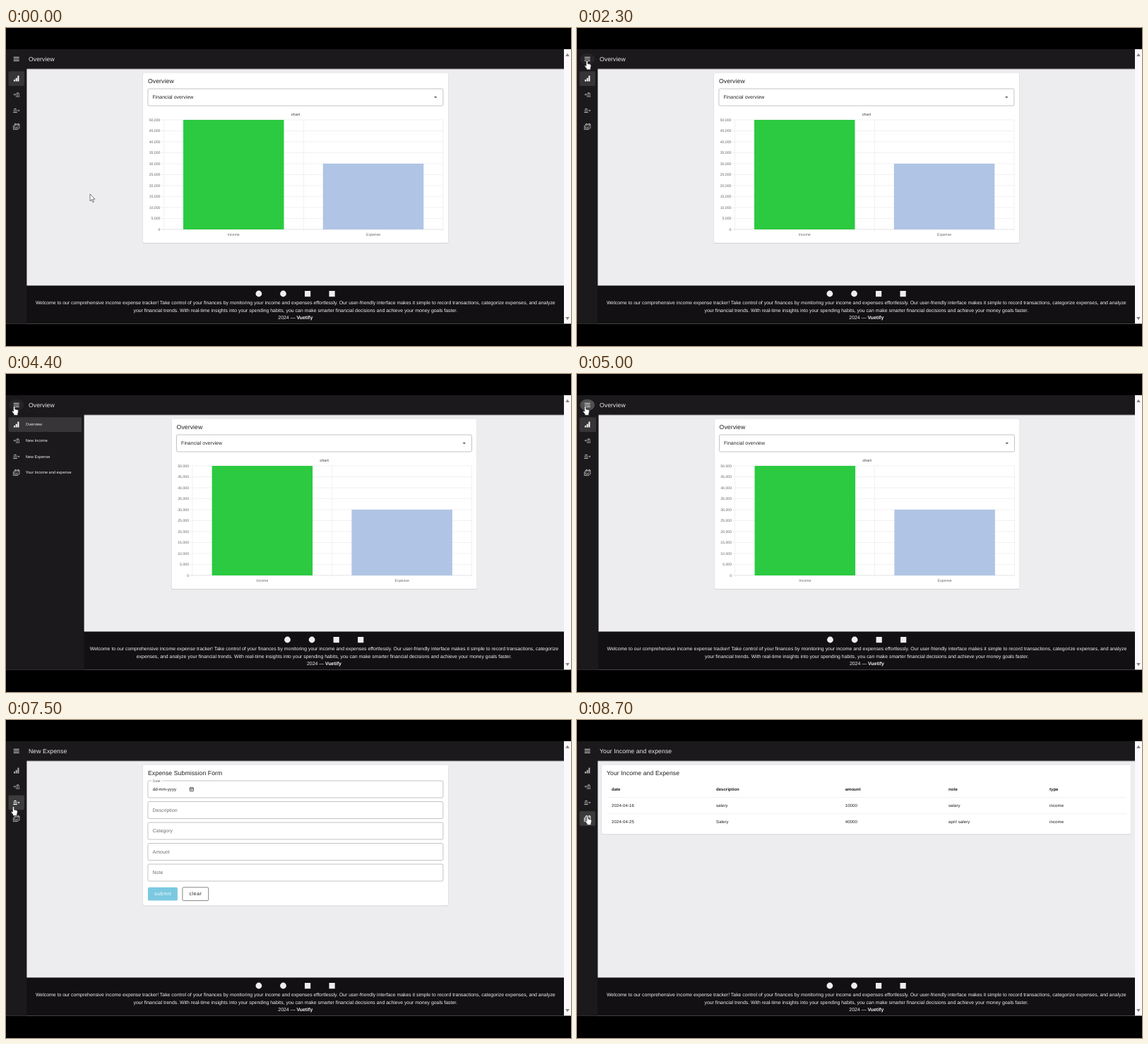
An HTML page for the animation above (9000 ms loop, 800 by 450 pixels).

```html
<!DOCTYPE html>
<html lang="en">
<head>
<meta charset="utf-8">
<title>Income expense tracker</title>
<style>
  html, body { margin: 0; width: 100%; height: 100%; overflow: hidden; background: #000; }
  svg { display: block; width: 800px; height: 450px; }
  text { font-family: "Liberation Sans", Arial, sans-serif; text-rendering: geometricPrecision; }
</style>
</head>
<body>
<svg id="stage" viewBox="0 0 800 450"></svg>
<script>
const RAIL = 29.4, OPEN = 110.6, DARK = '#1b191b', BODY = 6.91;
const ITEM_Y = [71.5, 94.2, 116.8, 139.4];
const NAV = ['Overview', 'New Income', 'New Expense', 'Your Income and expense'];
const WORDS = ('Welcome to our comprehensive income expense tracker! Take control of your finances by ' +
  'monitoring your income and expenses effortlessly. Our user-friendly interface makes it simple to record ' +
  'transactions, categorize expenses, and analyze your financial trends. With real-time insights into your ' +
  'spending habits, you can make smarter financial decisions and achieve your money goals faster.').split(' ');

const text = (x, y, s, size, fill = '#1c1c1c', more = '') =>
  `<text x="${x}" y="${y}" font-size="${size}" fill="${fill}" ${more}>${s}</text>`;
const rect = (x, y, w, h, fill, more = '') =>
  `<rect x="${x}" y="${y}" width="${w}" height="${h}" fill="${fill}" ${more}/>`;
const path = (d, more = '') => `<path d="${d}" ${more}/>`;
const mid = 'text-anchor="middle"';

const card = (x, w, h, title) =>
  rect(x - .3, 64.3, w + .6, h + .5, '#c9c8cb', 'rx="1.8"') + rect(x, 64, w, h, '#fff', 'rx="1.7"') +
  text(x + 7, 77.6, title, 8.65, '#1c1c1c', 'letter-spacing=".1"');
const field = y => rect(200.9, y, 418, 24, 'none', 'rx="1.8" stroke="#9b9a9c" stroke-width=".6"');

function chartPage() {
  let s = card(194, 432, 240, 'Overview') + field(86) +
    text(207.5, 100.4, 'Financial overview', BODY, '#222', 'letter-spacing=".06"') +
    path('M606 97h4.4l-2.2 2.2z', 'fill="#555"') +
    text(410, 124.4, 'chart', 5.2, '#666', mid + ' font-weight="bold"');
  for (let i = 0; i <= 10; i++) {
    const y = 285 - i * 15.5;
    s += rect(219.5, y - .25, 399.5, .5, i ? '#e3e3e5' : '#c8c8ca') +
      text(218.5, y + 1.7, (i * 5000).toLocaleString('en-US'), 5.2, '#666', 'text-anchor="end"');
  }
  for (const x of [223.3, 421.2, 619]) s += rect(x - .25, 130, .5, 157, '#e3e3e5');
  return s + rect(251, 130, 142.5, 155, '#2bca40') + rect(448.8, 192, 142.5, 93, '#b0c4e5') +
    text(322.2, 294.4, 'Income', 5.2, '#666', mid) + text(520.1, 294.4, 'Expense', 5.2, '#666', mid);
}

function formPage() {
  let s = card(194, 432, 198.5, 'Expense Submission Form');
  ['', 'Description', 'Category', 'Amount', 'Note'].forEach((label, i) => {
    s += field(86 + i * 29.5) + text(207.5, 100.4 + i * 29.5, label, BODY, '#6d6c6e', 'letter-spacing=".06"');
  });
  return s + rect(206.3, 84.5, 14.5, 3, '#fff') + text(207.8, 87.5, 'Date', 5.2, '#6d6c6e') +
    text(207.8, 100.3, 'dd-mm-yyyy', 6.1) +
    rect(260.2, 95.8, 5.2, 5, 'none', 'stroke="#222" stroke-width=".7" rx=".5"') +
    path('M260 97.2h5.6M261.6 94.7v1M264 94.7v1M261.5 99h2.6', 'stroke="#222" stroke-width=".7"') +
    rect(200.9, 236.8, 42, 18.8, '#7bc9e1', 'rx="1.7"') +
    text(222.2, 248.3, 'submit', BODY, '#fff', mid + ' letter-spacing=".62"') +
    rect(249.9, 236.8, 36.8, 18.8, '#fff', 'rx="1.7" stroke="#333" stroke-width=".6"') +
    text(268.5, 248.3, 'clear', BODY, '#1c1c1c', mid + ' letter-spacing=".62"');
}

function tablePage() {
  const cols = [49, 197, 379.7, 526, 669];
  const rows = [['date', 'description', 'amount', 'note', 'type'],
    ['2024-04-16', 'salery', '10000', 'salary', 'income'],
    ['2024-04-25', 'Salery', '40000', 'april salery', 'income']];
  let s = card(35, 749.5, 97.5, 'Your Income and Expense');
  rows.forEach((row, r) => {
    const y = 100 + r * 23;
    row.forEach((cell, c) => s += text(cols[c], y, cell, 6.05, '#1c1c1c',
      r ? 'letter-spacing=".1"' : 'font-weight="bold"'));
    if (r < 2) s += rect(42, y + 9.6, 736, .5, '#e4e3e6');
  });
  return s;
}

// Icons are drawn around the centre of their list item.
const bank = x => `M${x - 2.8} -1.5L${x} -3.2L${x + 2.8} -1.5ZM${x - 2.8} 2.2h5.6v1h-5.6z` +
  [-2.2, -.4, 1.4].map(d => `M${x + d} -.9h.8v2.5h-.8z`).join('');
const ICONS = [
  path('M-3.7 1.5h2v2.4h-2zM-1 -.8h2v4.7h-2zM1.7 -4h2v7.9h-2z', 'fill="#fff"'),
  path(bank(1.9) + 'M-4.6 -.4h2v-1.2l1.7 1.6l-1.7 1.6v-1.2h-2z', 'fill="#fff"'),
  path(bank(-1.7) + 'M1.4 -.4h1.6v-1.2l1.7 1.6l-1.7 1.6v-1.2h-1.6z', 'fill="#fff"'),
  path('M-2.6 -3.4h6.8v5.9h-6.8zM-2.6 -2.3h6.8M-1.2 -4.6v1.2M2.8 -4.6v1.2M-4.3 -1.5v5.7h6.7M-.8 .2l1.2 1.2l2.2 -2.2',
    'fill="none" stroke="#fff" stroke-width=".9"')
];
const navItems = NAV.map((label, i) =>
  `<g transform="translate(0 ${ITEM_Y[i]})">` +
  `<rect class="back" x="3.5" y="-10.3" height="20.7" rx="1.7" fill="#fff"/>` +
  `<g class="icon" transform="translate(14.7 0)">${ICONS[i]}</g>` +
  text(27.8, 1.9, label, 5.6, '#f2f2f2') + '</g>').join('');

const stage = document.getElementById('stage');
stage.innerHTML =
  `<clipPath id="clip"><rect id="clipBox" y="58" height="361"/></clipPath>` +
  rect(0, 30, 790, 388.5, '#edecee') +
  `<g id="main">${[chartPage(), formPage(), tablePage()].map(p => `<g class="page">${p}</g>`).join('')}</g>` +
  rect(0, 364.5, 790, 54, '#121012') +
  `<g id="footer"><g fill="#eee"><circle cx="357.9" cy="376" r="4.4"/><circle cx="392.5" cy="376" r="4.4"/></g>` +
  rect(423, 372, 8.2, 8.2, '#eee') + rect(457.5, 372, 8.2, 8.2, '#eee') +
  text(409.8, 391.1, '', BODY, '#f4f4f4', mid + ' class="line"') +
  text(409.8, 401.5, '', BODY, '#f4f4f4', mid + ' class="line"') +
  text(409.8, 412.3, '2024 — <tspan font-weight="bold">Vuetify</tspan>', BODY, '#f4f4f4', mid) + '</g>' +
  rect(0, 57.6, 790, 1, '#000', 'opacity=".3"') +
  `<rect id="drawer" y="57" height="361.5" fill="${DARK}"/><g clip-path="url(#clip)">${navItems}</g>` +
  rect(0, 30, 790, 27.7, DARK) +
  `<ellipse id="halo" cx="14.7" cy="43.9" rx="10.3" ry="8.2" fill="#fff"/>` +
  path('M10.7 41.4h8M10.7 43.9h8M10.7 46.4h8', 'stroke="#eee" stroke-width=".95"') +
  `<text id="title" x="32" y="46.8" font-size="8.65" fill="#eee" letter-spacing=".1"/>` +
  rect(790, 30, 10, 388.5, '#fbf9fc') +
  path('M792.2 40l2.8 -4.2l2.8 4.2zM792.2 409l2.8 4.2l2.8 -4.2z', 'fill="#858487"') +
  `<g id="cursor" fill="#fff" stroke="#222" stroke-width=".6" stroke-linejoin="round">` +
  path('M0 0V9.8L2.2 7.8L3.8 11.5L5.4 10.8L3.8 7.2H6.9Z', 'id="arrow"') +
  path('M-1.1 .9Q0 -.7 1.1 .9V4.6L4.4 5.3Q6 5.8 5.8 7.5L5 11V13H-.5V11.5L-3.4 7.8Q-3.6 6.3 -1.1 7.7Z', 'id="hand"') +
  '</g>';

const $ = id => document.getElementById(id);
const all = name => [...stage.querySelectorAll('.' + name)];
const backs = all('back'), icons = all('icon'), pages = all('page'), lines = all('line');

const clamp = v => Math.max(0, Math.min(1, v));
const smooth = p => p * p * (3 - 2 * p);
const slide = p => smooth(1 - (1 - clamp(p)) ** 1.5);
const ripple = (t, start) => clamp((t - start) / 100) * clamp((start + 650 - t) / 300);

// time, x, y
const TRACK = [[0, 119, 235], [100, 119, 235], [1000, 12, 57], [1700, 12, 55], [2050, 14, 46],
  [3000, 14.7, 45.3], [4150, 14.7, 45.3], [4400, 11.7, 45.3], [5350, 11.7, 45.3], [5700, 12, 78],
  [6200, 10.5, 116], [6600, 10.5, 118.5], [7100, 10.5, 122.5], [7500, 10.5, 122.5],
  [8000, 13.5, 137], [8500, 13.5, 137], [8700, 14.8, 135.5], [9000, 14.8, 135.5]];

function cursorAt(t) {
  const i = TRACK.findIndex(k => k[0] > t), [t0, x0, y0] = TRACK[i - 1], [t1, x1, y1] = TRACK[i];
  const p = smooth((t - t0) / (t1 - t0));
  return [x0 + (x1 - x0) * p, y0 + (y1 - y0) * p];
}

function draw(t) {
  const w = RAIL + (OPEN - RAIL) * (slide((t - 2500) / 200) - slide((t - 4835) / 200));
  const shift = `translate(${(w - RAIL) / 2} 0)`;
  const active = t < 6800 ? 0 : t < 8200 ? 2 : 3;
  const [x, y] = cursorAt(t);

  $('drawer').setAttribute('width', w);
  $('clipBox').setAttribute('width', w - 3.5);
  $('main').setAttribute('transform', shift);
  $('footer').setAttribute('transform', shift);
  pages.forEach((p, i) => p.style.display = i === [0, 0, 1, 2][active] ? '' : 'none');
  $('title').textContent = NAV[active];

  const room = 776.2 - w;
  const last = room > 738 ? 'analyze' : room > 712 ? 'and' : room > 699 ? 'expenses,' : 'categorize';
  const cut = WORDS.indexOf(last, 25) + 1;
  lines[0].textContent = WORDS.slice(0, cut).join(' ');
  lines[1].textContent = WORDS.slice(cut).join(' ');

  const clicks = [0, 0, ripple(t, 6450), ripple(t, 8150)];
  backs.forEach((b, i) => {
    const hover = x < w - 3.5 && Math.abs(y - ITEM_Y[i]) < 10.3;
    b.setAttribute('width', w - 7);
    b.setAttribute('rx', 1.7 + 4 * clicks[i] * (i !== active));
    b.setAttribute('opacity', .12 * (i === active) + .03 * hover + .14 * clicks[i] * (i !== active));
    icons[i].setAttribute('opacity', i === active ? 1 : .65);
  });
  const onMenu = x < 26 && y < 53;
  $('halo').setAttribute('opacity', .05 * onMenu + .19 * (ripple(t, 2450) + ripple(t, 4750)));

  const hand = onMenu || (x < w - 3.5 && y > 61 && y < 150);
  $('cursor').setAttribute('transform', `translate(${x} ${y})`);
  $('hand').style.display = hand ? '' : 'none';
  $('arrow').style.display = hand ? 'none' : '';
}

const start = performance.now();
function tick() {
  draw((performance.now() - start) % 9000);
  requestAnimationFrame(tick);
}
tick();
</script>
</body>
</html>
```
